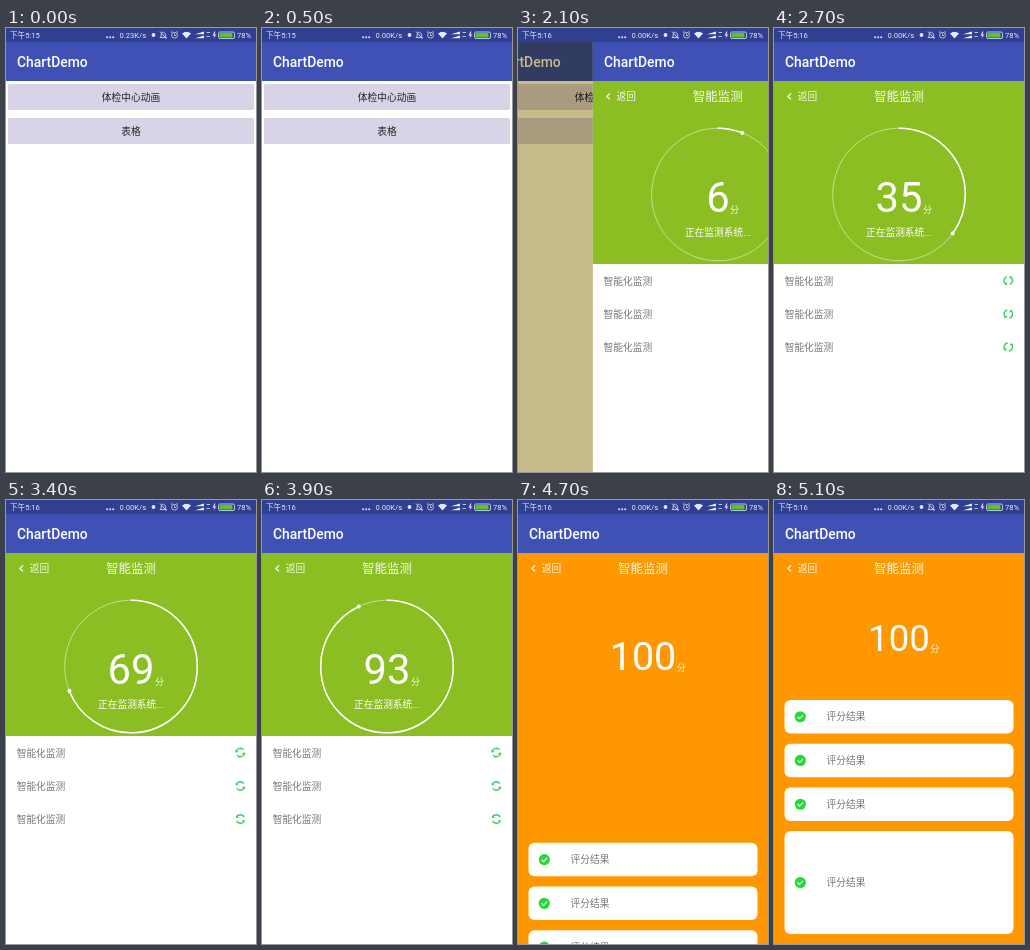
An HTML page for the animation above (6 s loop, 250 px wide and 444 px high).

```html
<!DOCTYPE html>
<html lang="zh-CN">
<head>
<meta charset="utf-8">
<title>ChartDemo</title>
<style>
html, body { margin: 0; width: 100%; height: 100%; overflow: hidden; background: #fff; }
svg { display: block; width: 100vw; height: 100vh; }
text { font: 9.72px Roboto, "Noto Sans CJK SC", "Noto Sans CJK", sans-serif; fill: #fff; }
.bar { font-size: 13.9px; font-weight: 500; }
.btn { fill: #222; font-weight: 500; }
.mid { text-anchor: middle; }
.gray { fill: #777; }
.status text { font-size: 7.6px; fill: #e8eaf6; }
.line { fill: none; stroke: #dfe3f5; stroke-width: .8; }
#dim { mix-blend-mode: multiply; }
</style>
</head>
<body>
<svg viewBox="0 0 250 444">
  <defs>
    <g id="appbar">
      <rect y="14" width="250" height="39" fill="#3f51b5"/>
      <text class="bar" x="11" y="38.5">ChartDemo</text>
    </g>
    <g id="spin" fill="none" stroke="#35cf5c" stroke-width="1.4">
      <path d="M-1.6 -3.9A4.2 4.2 0 0 0 -2.4 3.5M1.6 3.9A4.2 4.2 0 0 0 2.4 -3.5"/>
      <path d="M-4 4.2H-1.2V1.4ZM4 -4.2H1.2V-1.4Z" fill="#35cf5c" stroke="none"/>
    </g>
  </defs>

  <g id="home">
    <rect width="250" height="444" fill="#fff"/>
    <use href="#appbar"/>
    <g fill="#d9d3e8">
      <rect x="2" y="56" width="246" height="26" rx="1.5"/>
      <rect x="2" y="90" width="246" height="26" rx="1.5"/>
    </g>
    <text class="btn mid" x="125" y="73">体检中心动画</text>
    <text class="btn mid" x="125" y="106.5">表格</text>
  </g>
  <rect id="dim" width="250" height="444" fill="#c8bb8a"/>

  <g id="page">
    <rect width="250" height="444" fill="#fff"/>
    <g id="list"></g>
    <rect id="panel" y="53" width="250"/>
    <use href="#appbar"/>
    <path d="M17 65.4L14 68.4L17 71.4" fill="none" stroke="#fff" stroke-width="1.2"/>
    <text x="23.7" y="72" fill-opacity=".9">返回</text>
    <text class="mid" x="125" y="73" fill-opacity=".9" style="font-size:12.5px">智能监测</text>
    <g id="dial">
      <circle cx="125" cy="166.5" r="66.3" fill="none" stroke="#fff" stroke-opacity=".5"/>
      <circle id="arc" cx="125" cy="166.5" r="66.3" fill="none" stroke="#fff" stroke-width="1.5"
        pathLength="100" transform="rotate(-90 125 166.5)"/>
      <circle id="dot" cx="125" cy="100.2" r="2" fill="#fff"/>
      <text class="mid" x="125" y="208">正在监测系统...</text>
    </g>
    <text id="score" class="mid" x="125"></text>
    <text id="unit" fill-opacity=".9" style="font-size:9px">分</text>
    <g id="cards"></g>
  </g>

  <g class="status">
    <rect width="250" height="14" fill="#303f8f"/>
    <text id="clock" x="4" y="10"></text>
    <g fill="#e8eaf6">
      <circle cx="101.2" cy="9.2" r="1"/><circle cx="104.2" cy="9.2" r="1"/><circle cx="107.2" cy="9.2" r="1"/>
      <circle cx="147.5" cy="7" r="1.9"/>
      <path d="M176 5.6Q180.500 2 185 5.600L180.500 10.600Z"/>
      <path d="M208.500 3.500L206.500 7.500H208.300L207.500 10.500L210.300 6.500H208.400L209.500 3.500Z"/>
      <path d="M189 6.300L198 3.500V6.300ZM189 10.300L198 7.500V10.300Z"/>
    </g>
    <text id="speed" x="113.5" y="10"></text>
    <path class="line" d="M154 9.500H160.500L159.300 8V6Q157.200 2 155.200 6V8ZM154 3.500L160.500 11"/>
    <circle class="line" cx="168.500" cy="7.200" r="2.900"/>
    <path class="line" d="M168.500 5.500V7.500H170M165 4.500L166.500 3.300M172 4.500L170.500 3.300M200.500 4.500H204M200.500 8.500H204"/>
    <rect class="line" x="212.500" y="4" width="16" height="6.500" rx="1.500"/>
    <rect x="213.500" y="5" width="13" height="4.500" rx=".8" fill="#55c52c"/>
    <text x="231" y="10">78%</text>
  </g>
</svg>
<script>
const $ = id => document.getElementById(id);
const set = (id, attrs) => {
  for (const k in attrs) $(id).setAttribute(k, attrs[k]);
};
const clamp = v => Math.min(1, Math.max(0, v));
const ramp = (t, start, length) => clamp((t - start) / length);
const mix = (a, b, p) => a + (b - a) * p;

const rows = [252.5, 286, 319];
$('list').innerHTML = rows.map((y, i) =>
  `<text class="gray" x="10.7" y="${y + 4}">智能化监测</text><use id="spin${i}" href="#spin"/>`).join('');

$('cards').innerHTML = [[200, 33.5], [243.700, 33.5], [287.500, 33.5], [331, 103]].map(([y, h]) => {
  const c = y + h / 2;
  return `<rect x="10.5" y="${y}" width="229" height="${h}" rx="6" fill="#fff"/>
    <circle cx="26.3" cy="${c}" r="5.6" fill="#22dc35"/>
    <path d="M23.6 ${c}l2 2l3.400 -3.600" fill="none" stroke="#fff" stroke-width="1.200"/>
    <text class="gray" x="52.500" y="${c + 3.500}">评分结果</text>`;
}).join('');

const GREEN = [139, 190, 34], ORANGE = [255, 152, 0];

function draw(t) {
  $('clock').textContent = t < 1900 ? '下午5:15' : '下午5:16';
  $('speed').textContent = t < 500 ? '0.23K/s' : '0.00K/s';

  // page slides in while the old screen drifts left
  const left = 250 * (1 - ramp(t, 1980, 300)) ** 2.36;
  set('page', { transform: `translate(${left})` });
  set('home', { transform: `translate(${(left - 250) * .223})` });
  set('dim', { opacity: clamp((250 - left) / 175) });

  // counting and ring
  const value = Math.floor(100 * ramp(t, 1976, 2060));
  set('arc', { 'stroke-dasharray': `${value} 200` });
  set('dot', { transform: `rotate(${value * 3.6} 125 166.5)` });
  rows.forEach((y, i) => set('spin' + i, {
    transform: `translate(234.3 ${y}) rotate(${(t - 2700) * .36 + i * 8})`
  }));

  // panel fills the screen, then the result cards rise
  const grow = ramp(t, 4050, 300);
  const color = GREEN.map((c, i) => Math.round(mix(c, ORANGE[i], grow)));
  set('panel', { height: mix(183, 391, grow), fill: `rgb(${color})` });
  set('dial', { opacity: 1 - grow });

  const rise = ramp(t, 4400, 700);
  const size = mix(41.7, 36.5, rise);
  const base = mix(183.5, 151, rise);
  $('score').textContent = value;
  $('score').style.fontSize = size + 'px';
  set('score', { y: base });
  set('unit', { x: 125.5 + String(value).length * size * .281, y: base + 1 });
  set('cards', { transform: `translate(0 ${250 * (1 - rise)})` });
}

const start = performance.now();
function tick() {
  const t = (performance.now() - start) % 6000;
  draw(Math.floor(t / 100) * 100);
  requestAnimationFrame(tick);
}
tick();
</script>
</body>
</html>
```
